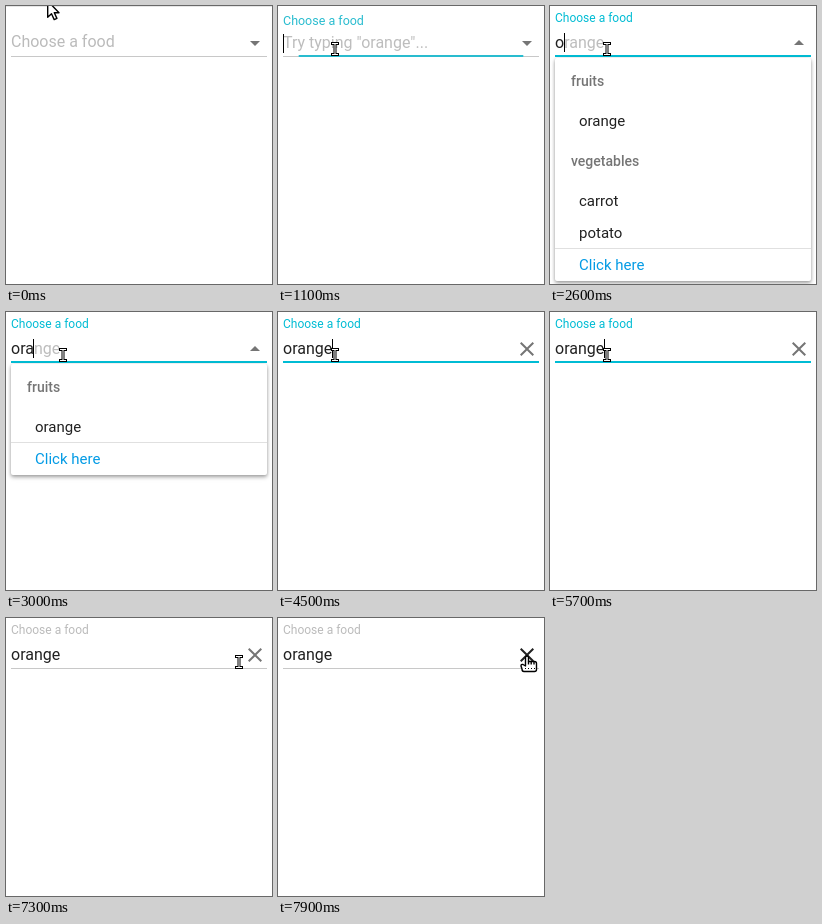
Recreate the animation shown at these times as an HTML page. Size 266 by 278 pixels, loop 8000 ms.

```html
<!DOCTYPE html>
<html lang="en">
<head>
<meta charset="utf-8">
<title>Autocomplete field</title>
<style>
  html, body { margin: 0; width: 100%; height: 100%; overflow: hidden; background: #fff; }
  svg { display: block; width: 266px; height: 278px; font-family: Roboto, sans-serif; }
  text { white-space: pre; }
  .value { font-size: 16px; fill: #212121; }
  .hint { fill: #bdbdbd; }
  .item { font-size: 15px; fill: #212121; }
  .head { font-size: 14px; font-weight: 500; fill: #757575; }
  .link { fill: #039be5; }
  #panel { fill: #fff; filter: drop-shadow(0 2px 2px #0004) drop-shadow(0 1px 1.5px #0003); }
  .pointer { fill: #fff; stroke: #000; stroke-width: 1.4; stroke-linejoin: round; }
</style>
</head>
<body>
<svg viewBox="0 0 266 278">
  <rect id="edge" width="266" height="1" fill="#e6e6e6"/>
  <rect x="5" y="50" width="256" height="1" fill="#c8c8c8"/>
  <rect id="focusLine" y="49" height="2"/>
  <text id="label" x="5">Choose a food</text>
  <text class="value" x="5" y="42"><tspan id="typed"></tspan><tspan id="hint" class="hint"></tspan></text>
  <rect id="caret" width="1" height="19" fill="#000"/>
  <path id="icon" transform="translate(237 25)"/>
  <g id="menu">
    <rect id="panel" x="5" y="52" width="256" rx="2"/>
    <text class="head" x="21" y="80">fruits</text>
    <text class="item" x="29" y="120">orange</text>
    <g id="more">
      <text class="head" x="21" y="160">vegetables</text>
      <text class="item" x="29" y="200">carrot</text>
      <text class="item" x="29" y="232">potato</text>
    </g>
    <g id="footer">
      <rect x="5" y="130" width="256" height="1" fill="#e0e0e0"/>
      <text class="item link" x="29" y="152">Click here</text>
    </g>
  </g>
  <g id="cursor">
    <path id="arrow" class="pointer" d="M.7 1V17.3L4.5 13.8 7.2 19.6 9.9 18.4 7.3 12.7H12Z"/>
    <g id="beam" fill="none" stroke-linecap="square">
      <path d="M-2.5 -5.5H2.5M-2.5 5.5H2.5M0 -5.5V5.5" stroke="#000" stroke-width="3"/>
      <path d="M-2.5 -5.5H2.5M-2.5 5.5H2.5M0 -5.5V5.5" stroke="#fff" stroke-width="1"/>
    </g>
    <g id="hand" class="pointer">
      <path d="M-1.5 9V1.5Q-1.5 0 0 0T1.5 1.5V5.5H7.5Q9.5 5.5 9.5 7.5V13.5Q9.5 15.5 7.5 15.5H-3Q-5 15.5 -5 13L-6 10Q-6 8 -4 8.5L-1.5 10Z"/>
      <path d="M1.5 5.5V8.5M4.2 6V8.5M7 6V8.5"/>
      <path d="M-2 12.5H8" stroke-width="1" stroke-dasharray="1 2"/>
    </g>
  </g>
</svg>
<script>
const LOOP = 8000, TICK = 100;
const FOCUS = 1000, TYPE = 2400, KEY_GAP = 300, KEYS = 3, PICK = 4500, BLUR = 6700;
const BLINK = 600, WORD = 'orange';
const CYAN = [0, 188, 212], GREY = [187, 187, 187];
const ICONS = {
  down: 'M7 10l5 5 5-5z',
  up: 'M7 14l5-5 5 5z',
  close: 'M19 6.41L17.59 5 12 10.59 6.41 5 5 6.41 10.59 12 5 17.59 6.41 19 12 13.41 17.59 19 19 17.59 13.41 12z'
};
const HOME = { x: 41, y: -6 };
const MOVES = [
  { start: 200, end: 700, x: 57, y: 43, bow: 12 },
  { start: 6200, end: 6600, x: 122, y: 83, bow: 0 },
  { start: 7000, end: 7600, x: 249, y: 38, bow: 0 }
];

const el = Object.fromEntries([...document.querySelectorAll('[id]')].map(n => [n.id, n]));
const set = (node, attrs) => { for (const k in attrs) node.setAttribute(k, attrs[k]); };
const show = (node, on) => { node.style.display = on ? '' : 'none'; };
const clamp = (v, lo, hi) => Math.min(hi, Math.max(lo, v));
const lerp = (a, b, p) => a + (b - a) * p;
const ramp = (t, start, length) => clamp((t - start) / length, 0, 1);
const smooth = p => p * p * (3 - 2 * p);
const easeOut = p => 1 - (1 - p) ** 3;
const blend = (a, b, p) => `rgb(${a.map((v, i) => Math.round(lerp(v, b[i], p)))})`;

function pointerAt(t) {
  return MOVES.reduce((from, move) => {
    const p = easeOut(ramp(t, move.start, move.end - move.start));
    return {
      x: lerp(from.x, move.x, p) - move.bow * Math.sin(Math.PI * p),
      y: lerp(from.y, move.y, p)
    };
  }, HOME);
}

function drawField(t, keys) {
  const focus = ramp(t, FOCUS, 128), blur = ramp(t, BLUR, 270);
  const fill = blend(GREY, CYAN, focus - blur);
  const rise = smooth(focus), width = 256 * (rise - smooth(blur));
  set(el.label, { y: Math.floor(lerp(41, 16, rise)), 'font-size': lerp(16, 12, rise), fill });
  set(el.focusLine, { x: 133 - width / 2, width, fill });

  const typed = t >= PICK ? WORD : WORD.slice(0, keys);
  el.typed.textContent = typed;
  el.hint.textContent = typed ? WORD.slice(typed.length) : t > FOCUS ? 'Try typing "orange"...' : '';

  // The blink restarts at every edit
  const edited = t >= PICK ? PICK : keys ? TYPE + (keys - 1) * KEY_GAP : FOCUS;
  const lit = Math.floor((t - edited) / BLINK) % 2 === 0;
  show(el.caret, t > FOCUS && t < BLUR && lit);
  set(el.caret, { x: 5 + Math.floor(el.typed.getComputedTextLength()), y: typed ? 27 : 28 });
  show(el.edge, t < 300);
}

function drawMenu(t, keys, hover) {
  const open = keys > 0 && t < PICK, long = keys < 2;
  show(el.menu, open);
  show(el.more, long);
  set(el.panel, { height: long ? 223 : 111 });
  set(el.footer, { transform: `translate(0 ${long ? 112 : 0})` });
  set(el.icon, { d: ICONS[open ? 'up' : keys ? 'close' : 'down'], fill: hover ? '#212121' : '#757575' });
}

function drawPointer({ x, y }, kind) {
  for (const name of ['arrow', 'beam', 'hand']) show(el[name], name === kind);
  set(el.cursor, { transform: `translate(${Math.round(x)} ${Math.round(y)})` });
}

function frame(now) {
  const t = Math.floor(now % LOOP / TICK) * TICK;
  const keys = clamp(Math.floor((t - TYPE) / KEY_GAP) + 1, 0, KEYS);
  const pointer = pointerAt(t);
  const overInput = pointer.y > 24 && pointer.y < 51;
  const kind = !overInput ? 'arrow' : pointer.x > 237 ? 'hand' : 'beam';
  drawField(t, keys);
  drawMenu(t, keys, kind === 'hand');
  drawPointer(pointer, kind);
}

let start;
function loop(now) {
  start ??= now;
  frame(now - start);
  requestAnimationFrame(loop);
}
frame(0);
requestAnimationFrame(loop);
</script>
</body>
</html>
```
